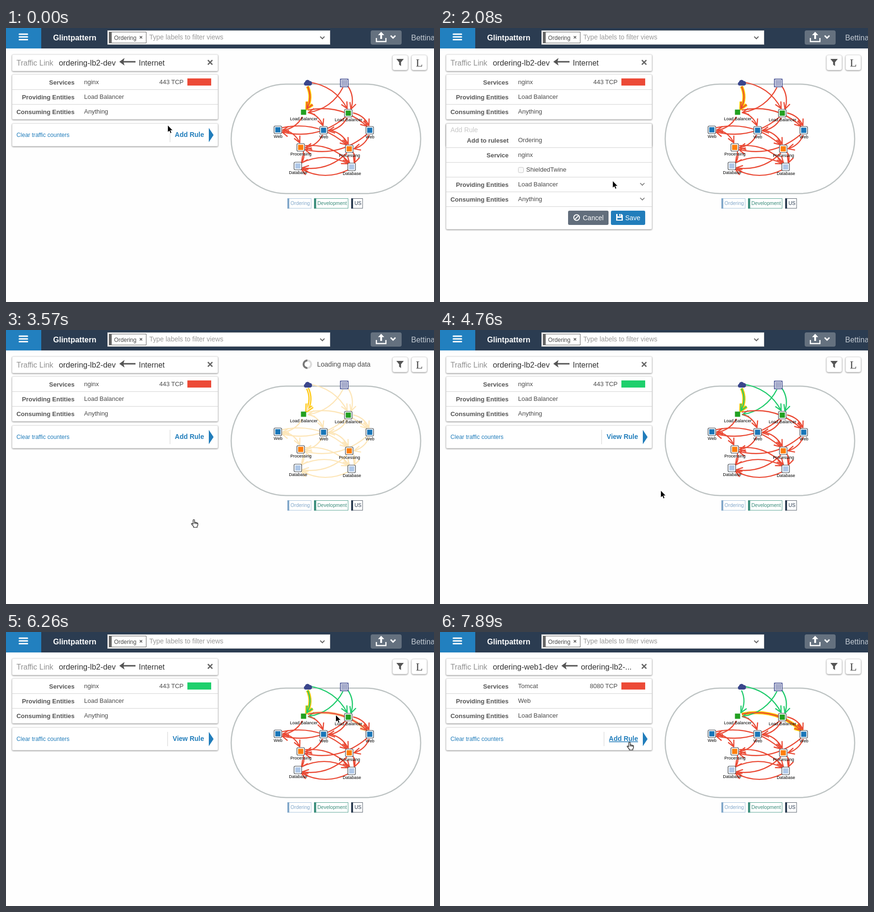
These frames come from a looping animation (899x576 px, 8000 ms). An HTML page:

```html
<!DOCTYPE html>
<html lang="en">
<head>
<meta charset="utf-8">
<title>Traffic map</title>
<style>
html, body { margin: 0; width: 100%; height: 100%; overflow: hidden; background: #fefefe; }
svg { display: block; width: 899px; height: 576px; font: 13px "Liberation Sans", Arial, sans-serif; fill: #4a4a4a; }
.s9 { font-size: 9px; fill: #000; text-anchor: middle; }
.s10 { font-size: 10.5px; }
.s12 { font-size: 12.1px; }
.s14 { font-size: 14px; }
.s16 { font-size: 16px; }
.host { font-size: 16.4px; fill: #333; }
.b { font-weight: bold; }
.label { font-weight: bold; text-anchor: end; fill: #555; }
.end { text-anchor: end; }
.mid { text-anchor: middle; }
.blue { fill: #217dbb; }
.white { fill: #fff; }
.card { fill: #fff; stroke: #ddd; stroke-width: .6; filter: drop-shadow(0 1px 1.5px #0007); }
.rule { stroke: #d4d4d4; fill: none; }
.line { fill: none; stroke-width: 2; }

/* One 8 s timeline; every change is a hard step. */
.t { animation: 8s step-end -8ms infinite; }
.add { animation-name: add; }
.form, .view, .load, .second, .hover, .under, .arrow, .hand { visibility: hidden; }
.form { animation-name: form; }
.view { animation-name: view; }
.load { animation-name: load; }
.first { animation-name: first; }
.second { animation-name: second; }
.hover { animation-name: hover; }
.under { animation-name: under; }
.save { fill: #217dbb; animation-name: save; }
.outer { stroke: #ea4a35; animation-name: outer; }
.inner { stroke: #ea4a35; animation-name: inner; }
.cursor { animation-name: cursor; }
.arrow { animation-name: arrow; }
.hand { animation-name: hand; }
.spin { transform-origin: 633px 72px; animation: spin .8s steps(5) infinite; }
@keyframes add { 0%, 44.625%, 82% { visibility: visible } 16.75%, 55.75% { visibility: hidden } 100% { visibility: visible } }
@keyframes form { 16.75% { visibility: visible } 44.625% { visibility: hidden } }
@keyframes view { 55.75% { visibility: visible } 82% { visibility: hidden } }
@keyframes load { 44.625% { visibility: visible } 55.75% { visibility: hidden } }
@keyframes first { 0% { visibility: visible } 82%, 100% { visibility: hidden } }
@keyframes second { 0% { visibility: hidden } 82%, 100% { visibility: visible } }
@keyframes hover { 72.625% { visibility: visible } 82% { visibility: hidden } }
@keyframes under { 11.125%, 98.625%, 100% { visibility: visible } 0%, 16.75% { visibility: hidden } }
@keyframes save { 35.25% { fill: #1b689c } 44.625% { fill: #217dbb } }
@keyframes outer { 44.625% { stroke: #fde6b9 } 55.75%, 82%, 100% { stroke: #1fcb6c } }
@keyframes inner { 44.625% { stroke: #fde6b9 } 55.75% { stroke: #ea4a35 } }
@keyframes arrow {
  0%, 22.25%, 59.5% { visibility: visible }
  11.125%, 35.25%, 98.625%, 100% { visibility: hidden }
}
@keyframes hand {
  0%, 22.25%, 59.5% { visibility: hidden }
  11.125%, 35.25%, 98.625%, 100% { visibility: visible }
}
@keyframes cursor {
  0% { transform: translate(339px, 204px) }
  1.875% { transform: translate(342px, 213px) }
  3.69% { transform: translate(344px, 226px) }
  5.5% { transform: translate(340px, 231px) }
  9.25% { transform: translate(351px, 231px) }
  11.125% { transform: translate(364px, 231px) }
  22.25% { transform: translate(366px, 252px) }
  24.125% { transform: translate(365px, 298px) }
  26% { transform: translate(362px, 321px) }
  31.625% { transform: translate(367px, 337px) }
  33.5% { transform: translate(379px, 366px) }
  35.25% { transform: translate(390px, 391px) }
  37.125% { transform: translate(394.5px, 398px) }
  59.5% { transform: translate(463px, 337px) }
  61.375% { transform: translate(505px, 309px) }
  65.125% { transform: translate(565px, 276px) }
  67% { transform: translate(640px, 234px) }
  70.75% { transform: translate(690px, 204px) }
  72.625% { transform: translate(709px, 183px) }
  74.5% { transform: translate(705px, 181px) }
  76.375% { transform: translate(698px, 177px) }
  78.25% { transform: translate(692px, 174px) }
  91.25% { transform: translate(668px, 180px) }
  93.125% { transform: translate(590px, 201px) }
  95% { transform: translate(492px, 225px) }
  96.75% { transform: translate(422px, 235px) }
  98.625%, 100% { transform: translate(398px, 231px) }
}
@keyframes spin { to { transform: rotate(360deg) } }
</style>
</head>
<body>
<svg viewBox="0 0 899 576">
  <!-- Top bar -->
  <rect width="899" height="43" fill="#2b3c51"/>
  <rect width="74" height="43" fill="#2280bf"/>
  <path d="M28 13h17M28 18.7h17M28 24.4h17" stroke="#fff" stroke-width="3" stroke-linecap="round"/>
  <text x="99" y="26" class="s16 b white">Glintpattern</text>
  <rect x="213.5" y="5.5" width="467" height="29" fill="#fff" stroke="#ccc"/>
  <rect x="216.5" y="8.5" width="78" height="23" fill="#fff" stroke="#666"/>
  <rect x="216" y="8" width="6" height="24" fill="#666"/>
  <text x="227" y="25" class="s12">Ordering</text>
  <path d="M281 17l5 5m0-5l-5 5" class="line" stroke="#555" style="stroke-width:1.5"/>
  <text x="301" y="24" class="s14" fill="#9a9a9a">Type labels to filter views</text>
  <path d="M660 18l4.5 4.5l4.5-4.5" class="line" stroke="#666"/>
  <rect x="766" y="5" width="65" height="30" rx="4" fill="#65717f"/>
  <path d="M788 8l6.5 7h-4.5v8h-4v-8h-4.5z" class="white"/>
  <path d="M778 21v7.5h20v-7.5" class="line" stroke="#fff" style="stroke-width:2.5"/>
  <path d="M808 16l5 5l5-5" class="line" stroke="#fff" style="stroke-width:3"/>
  <text x="851" y="26" class="s16" fill="#c3cad2">Bettina</text>

  <!-- Link title -->
  <rect class="card" x="13" y="56" width="432" height="34.5" rx="2"/>
  <text x="22" y="79" class="s16" fill="#929292">Traffic Link</text>
  <g class="t first">
    <text x="111" y="79" class="host">ordering-lb2-dev</text>
    <path id="back" d="M238 71l11-8l-2 6.5h25v3h-25l2 6.5z" fill="#555"/>
    <text x="279" y="79" class="s16" fill="#333">Internet</text>
  </g>
  <g class="t second">
    <text x="111" y="79" class="host">ordering-web1-dev</text>
    <use href="#back" x="17"/>
    <text x="296" y="79" class="host">ordering-lb2-...</text>
  </g>
  <path d="M424 67.5l9.5 9.5m0-9.5l-9.5 9.5" class="line" stroke="#666" style="stroke-width:2.5"/>

  <!-- Link details -->
  <rect class="card" x="13" y="98" width="432" height="94" rx="2"/>
  <path class="rule" d="M13 129.500h432M13 160.500h432"/>
  <text x="144" y="119" class="label">Services</text>
  <text x="144" y="150" class="label">Providing Entities</text>
  <text x="144" y="181" class="label">Consuming Entities</text>
  <rect x="381" y="106" width="50" height="15" fill="#ec4a37"/>
  <rect class="t view" x="381" y="106" width="50" height="15" fill="#1ed06c"/>
  <g class="t first">
    <text x="164" y="118">nginx</text>
    <text x="373" y="118" class="end">443 TCP</text>
    <text x="164" y="149">Load Balancer</text>
    <text x="164" y="180">Anything</text>
  </g>
  <g class="t second">
    <text x="164" y="118">Tomcat</text>
    <text x="373" y="118" class="end">8080 TCP</text>
    <text x="164" y="149">Web</text>
    <text x="164" y="180">Load Balancer</text>
  </g>

  <!-- Rule bar -->
  <rect class="card" x="13" y="201" width="432" height="47.5" rx="2"/>
  <text x="22" y="229" class="s12 blue">Clear traffic counters</text>
  <path d="M426 210l10 15l-10 15z" class="blue"/>
  <g class="t add">
    <path class="rule" d="M344.5 210v30"/>
    <text x="416" y="229" class="s14 b blue end">Add Rule</text>
  </g>
  <rect class="t under blue" x="355" y="230" width="61" height="1.5"/>
  <g class="t view">
    <path class="rule" d="M339.5 210v30"/>
    <text x="416" y="229" class="s14 b blue end">View Rule</text>
  </g>

  <!-- Rule form -->
  <g class="t form">
    <rect class="card" x="13" y="201" width="432" height="222" rx="2"/>
    <path class="rule" d="M13 251.5h432M13 282.5h432M13 313.5h432M13 344.5h432M13 375.5h432"/>
    <text x="22" y="219" class="s14" fill="#c8c8c8">Add Rule</text>
    <text x="144" y="241" class="label">Add to ruleset</text>
    <text x="164" y="240">Ordering</text>
    <text x="144" y="272" class="label">Service</text>
    <text x="164" y="271">nginx</text>
    <rect x="164.5" y="293" width="11" height="11" rx="2.5" fill="#fafafa" stroke="#c4c4c4"/>
    <text x="181" y="302">ShieldedTwine</text>
    <text x="144" y="334" class="label">Providing Entities</text>
    <text x="164" y="333">Load Balancer</text>
    <text x="144" y="365" class="label">Consuming Entities</text>
    <text x="164" y="364">Anything</text>
    <path d="M420.5 326l4.5 4.5l4.5-4.5M420.5 357l4.5 4.5l4.5-4.5" class="line" stroke="#777" style="stroke-width:1.7"/>
    <rect x="269" y="384" width="85" height="30" rx="3" fill="#626e7c"/>
    <path d="M281 398.5a6 6 0 1 0 12 0a6 6 0 1 0-12 0M283 402.5l8-8" class="line" stroke="#fff"/>
    <text x="300" y="404" class="s14 white">Cancel</text>
    <rect class="t save" x="359" y="384" width="72" height="30" rx="3"/>
    <path d="M370 391h3v5h7v-5h1.5l2.5 2.5v11.5h-14zM376.500 391h2.5v4h-2.5zM372.5 399v4h9v-4z" class="white" fill-rule="evenodd"/>
    <text x="389" y="404" class="s14 white">Save</text>
  </g>

  <!-- Map tools -->
  <g class="t load">
    <g class="line" style="stroke-width:4">
      <circle cx="633" cy="72" r="8" stroke="#dcdcdc"/>
      <g class="spin"><path d="M633 80a8 8 0 0 1 0-16" stroke="#777" transform="rotate(-144 633 72)"/></g>
    </g>
    <text x="653.5" y="77" class="s14">Loading map data</text>
  </g>
  <rect class="card" x="812" y="57" width="32" height="31.5" rx="4"/>
  <path d="M820 65h15.5l-5.8 7v8l-4-3v-5z" fill="#555"/>
  <rect class="card" x="852" y="57" width="32" height="31.5" rx="4"/>
  <text x="868" y="81" class="mid" style="font:24px 'Liberation Serif',serif">L</text>

  <!-- Map -->
  <rect x="473" y="118" width="398" height="230" rx="115" fill="#fff" stroke="#bdc3c3" stroke-width="2.5"/>
  <g id="links" fill="none" stroke-linejoin="round"></g>
  <path d="M628.5 121a4 4 0 0 1-.5-7.500a5.5 5.5 0 0 1 10-2a4.8 4.8 0 0 1 1 9.5z" fill="#3a468c"/>
  <rect x="702.5" y="107.500" width="16" height="16" fill="#fff" stroke="#3a468c" stroke-width="1.7"/>
  <path d="M705 111h11M705 114h11M705 117h11M705 120h11" stroke="#3a468c" stroke-width="2" stroke-dasharray="2 1"/>
  <g id="nodes"></g>
  <g class="s10">
    <g fill="#82a8ca">
      <rect x="591.5" y="358.5" width="49.5" height="20.5" fill="#fff" stroke="#a9c4dc"/>
      <rect x="591" y="358" width="4" height="21.5"/><text x="597.5" y="372">Ordering</text>
    </g>
    <g fill="#3a8d7b">
      <rect x="647.5" y="358.5" width="71" height="20.5" fill="#fff" stroke="#5aa594"/>
      <rect x="647" y="358" width="4.5" height="21.5"/><text x="654" y="372">Development</text>
    </g>
    <g fill="#2b3c51">
      <rect x="725.5" y="358.5" width="23.5" height="20.5" fill="#fff" stroke="#59636f"/>
      <rect x="725" y="358" width="4" height="21.5"/><text x="732" y="372">US</text>
    </g>
  </g>

  <!-- Pointer -->
  <g class="t cursor">
    <path class="t arrow" d="M.5 0v15.500l3.500-3.200l2.400 5.200l2.700-1.200l-2.400-5h4.800z" fill="#000" stroke="#fff"/>
    <path class="t hand" d="M-1.5 10v-8.500q1.500-2 3 0v5q1.500-1 2.500.5q1.500-1 2.500.7q2-.7 2 1.300v3l-1.500 3v2h-7.500v-2l-4-4.500q-1-2 .5-2zM1.500 6.500v3M4 7v3M6.500 7.700v2.500" fill="#fff" stroke="#111" stroke-width="1.2"/>
  </g>
</svg>
<script>
const green = '#22a021', blue = '#1976b8', orange = '#ff7f0e', pale = '#aec7e8';
const at = {
  cloud: [627, 115], grid: [710, 115],
  lb1: [625, 177, green, 'Load Balancer'], lb2: [719, 179, green, 'Load Balancer'],
  web1: [571, 214, blue, 'Web'], web2: [667, 215, blue, 'Web'], web3: [764, 215, blue, 'Web'],
  proc1: [619, 251, orange, 'Processing'], proc2: [721, 254, orange, 'Processing'],
  db1: [613, 290, pale, 'Database'], db2: [726, 292, pale, 'Database']
};

function add(parent, tag, attrs, text) {
  const el = document.createElementNS('http://www.w3.org/2000/svg', tag);
  for (const k in attrs) el.setAttribute(k, attrs[k]);
  if (text) el.textContent = text;
  parent.append(el);
}

const polar = ([x, y], r, angle) => [x + r * Math.cos(angle), y + r * Math.sin(angle)];

// Curve between points on the rims of two nodes, bowed to one side, with an open head.
function linkPath(from, to) {
  const a = at[from], b = at[to], swing = 0.72, bow = 0.25;
  const chord = Math.atan2(b[1] - a[1], b[0] - a[0]);
  const p = polar(a, 10, chord - swing);
  const q = polar(b, 10, chord + Math.PI + swing);
  const dx = q[0] - p[0], dy = q[1] - p[1];
  const c = [(p[0] + q[0]) / 2 + bow * dy, (p[1] + q[1]) / 2 - bow * dx];
  const back = Math.atan2(c[1] - q[1], c[0] - q[0]);
  return `M${p}Q${c} ${q}M${polar(q, 15, back + 0.46)}L${q}L${polar(q, 15, back - 0.46)}`;
}

const links = document.getElementById('links');
const glow = (cls, from, to, stroke, width) =>
  add(links, 'path', { class: 't ' + cls, d: linkPath(from, to), stroke, 'stroke-width': width });
const join = (cls, sources, targets) => {
  for (const a of sources) for (const b of targets)
    add(links, 'path', { class: 't ' + cls, d: linkPath(a, b), 'stroke-width': 2.4 });
};
const lbs = ['lb1', 'lb2'], webs = ['web1', 'web2', 'web3'], procs = ['proc1', 'proc2'], dbs = ['db1', 'db2'];

glow('first', 'cloud', 'lb1', '#ffc800', 6.5);
glow('hover', 'lb1', 'web3', '#fcd9a0', 6);
glow('second', 'lb1', 'web3', '#ffc800', 6.5);
join('outer', ['cloud', 'grid'], lbs);
join('inner', lbs, webs);
join('inner', webs, procs);
join('inner', procs, dbs);
join('inner', ['db1'], ['db2']);
join('inner', ['db2'], ['db1']);

const nodes = document.getElementById('nodes');
for (const [id, [x, y, fill, label]] of Object.entries(at)) {
  if (!label) continue;
  if (id !== 'lb1') add(nodes, 'rect', { x: x - 8, y: y - 8, width: 16, height: 16, rx: 2.5, fill: '#fff', stroke: '#3b434c', 'stroke-width': 1.2 });
  add(nodes, 'rect', { x: x - 5.5, y: y - 5.5, width: 11, height: 11, fill });
  add(nodes, 'text', { x: x + 0.5, y: y + 17, class: 's9' }, label);
}
</script>
</body>
</html>
```
